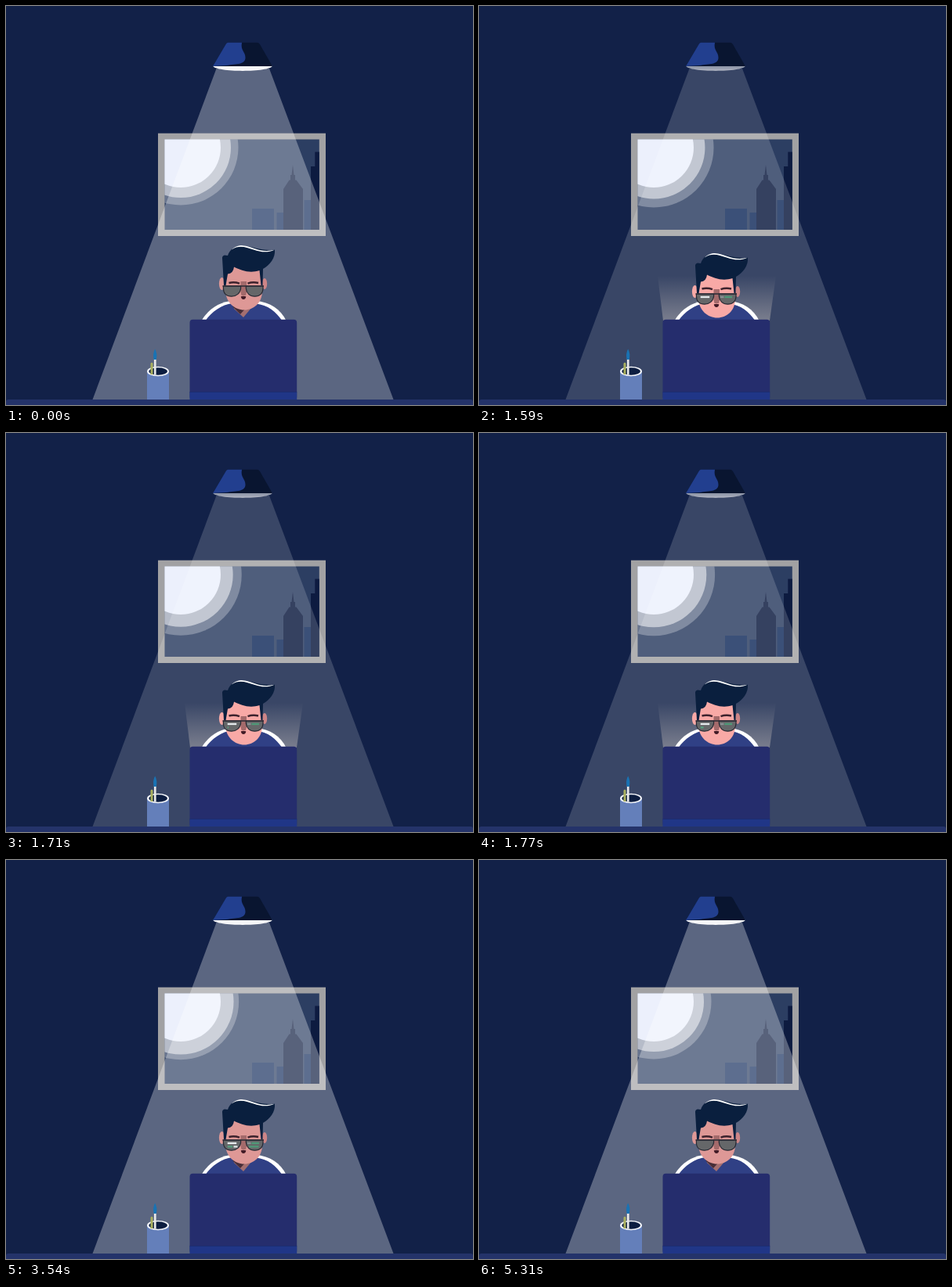
These frames come from a looping animation (596 by 510 pixels, 5340 ms). An HTML page:

```html
<!DOCTYPE html>
<html lang="en">
<head>
<meta charset="utf-8">
<title>Working late</title>
<style>
  html, body { margin: 0; width: 100%; height: 100%; overflow: hidden; background: #122148; }
  svg { display: block; width: 596px; height: 510px; }
</style>
</head>
<body>
<svg viewBox="0 0 596 510" xmlns="http://www.w3.org/2000/svg">
  <defs>
    <clipPath id="pane"><rect x="202.5" y="170.5" width="197.3" height="115.5"/></clipPath>
    <linearGradient id="screenLight" x1="0" y1="1" x2="0" y2="0">
      <stop offset="0" stop-color="#fff0df" stop-opacity=".33"/>
      <stop offset="1" stop-color="#fff0df" stop-opacity="0"/>
    </linearGradient>
  </defs>
  <rect width="596" height="510" fill="#122148"/>

  <!-- window -->
  <rect x="194" y="162.7" width="214" height="131.3" fill="#a1a1a3"/>
  <g clip-path="url(#pane)">
    <rect x="202" y="170" width="198" height="117" fill="#2c3e62"/>
    <circle id="outer" cx="223" cy="181" r="73.5" fill="#fff" opacity=".28"/>
    <circle id="middle" cx="223" cy="181" r="64" fill="#fff" opacity=".52"/>
    <circle cx="223" cy="181" r="51" fill="#ecf0fc"/>
    <path d="M314 259h28v28h-28z M345.5 264h9v23h-9z M380.5 248h8.5v39h-8.5z" fill="#142d5d"/>
    <path d="M354 287V234L361.5 222.5H363V216H364.5L366 203L367.5 216H369V222.5H370.5L379 234V287z M389 287V205H394.3V186.5H400V287z" fill="#0d1b40"/>
  </g>

  <!-- lamp -->
  <path id="cone" d="M268.5 80H336L494.5 503H110.5z" fill="#fff"/>
  <path id="bulb" d="M264 76.5H340C337 85 267 85 264 76.5z" fill="#fff"/>
  <path d="M283 46.7H321Q323 47 324 49L340 77H264L280.500 49Q281.500 47 283 46.700z" fill="#091530"/>
  <path d="M283 46.7H301C299 57 305.500 58 305.500 66C305.500 75 294 74 281 76L264 77L280.500 49Q281.500 47 283 46.700z" fill="#223f8f"/>

  <!-- cup -->
  <path d="M180 467H208V503H180z" fill="#647fba"/>
  <ellipse cx="194" cy="467" rx="14" ry="6.2" fill="#f4f6fa"/>
  <ellipse cx="194.200" cy="467" rx="11.800" ry="4.700" fill="#0c1d40"/>
  <path d="M184.500 457Q186 454.500 187.500 457V471H184.500z" fill="#a9b05e"/>
  <path d="M188.900 451H191.600V471.500H188.900z" fill="#e9e9ea"/>
  <path d="M190.200 438.500Q193.400 444 191.800 452H188.600Q187 444 190.200 438.500z" fill="#1973b4"/>

  <path id="glow" d="M235 402L228 345H379L371 402z" fill="url(#screenLight)"/>

  <!-- body -->
  <path d="M249 403C259 386 273 378 291 376.500H318C338 379 350 387 358 403z" fill="#fff"/>
  <path d="M254 403C263 390 275 382 289 380L303 378L319 380.500C334 382 345 391 353 403z" fill="#304085"/>
  <path d="M289 377H319L313 386L303 398L291 387z" fill="#a36f70"/>
  <path d="M289 384H308L299 394z" fill="#482e38"/>

  <g id="head">
    <ellipse class="skin" cx="275.600" cy="355" rx="3.700" ry="8"/>
    <ellipse cx="330" cy="355" rx="3.200" ry="7" fill="#cd8587"/>
    <path class="skin" d="M280 333H327V366C326 380 316 388.500 304 388.500C292 388.500 281 379 280.500 366z"/>
    <path d="M276 322Q276 319 279 318.500L283 319C286 310 294 305.500 303 306.300C318 308 327 314 343 311.500C344 322 337 331 328 336L327.500 357H325.500L323.500 338C311 342 300 338 291 333.500Q290 342 283 342.500L280.500 357H278z" fill="#0a1f3e"/>
    <path id="shine" d="M288 311.500C297 302 309 307 317 310C326 313.500 335 313.500 342.500 311.800C334 315.500 326 315 316 311.500C306 308 297 305 288 311.500z" fill="#fff"/>
    <path d="M299.500 352H307V366L306 370H300.500L299.500 366z" fill="#a46a6b"/>
    <g id="brows" fill="none" stroke="#3d222d" stroke-width="2.400">
      <path d="M284.500 354Q291 352.200 298 354.600"/>
      <path d="M308.500 354.600Q315 352.200 322 354"/>
    </g>
    <path d="M299.800 371.300Q303 370.300 306.300 371.300Q306 375 303 375Q300.200 375 299.800 371.300z" fill="#421b26"/>
    <g fill="#656769" stroke="#282a34" stroke-width="1.200">
      <path d="M277.400 358H299.600V361C299 367 294 371.200 287.800 371.200C281 371.200 277.400 367 277.400 361z"/>
      <path d="M306.300 358H328V361C328 367 324 371.200 317.500 371.200C311 371.200 306.800 367 306.300 361z"/>
      <path d="M276.500 358H329" stroke-width="1.500"/>
    </g>
    <g id="code" stroke-width="2.300"></g>
  </g>

  <!-- laptop and desk -->
  <rect x="234.500" y="400.700" width="136.700" height="102.500" rx="4" fill="#252d6d"/>
  <rect x="234.500" y="493.500" width="136.700" height="10" fill="#203687"/>
  <path d="M234.500 493.500H371.200" stroke="#1b2d70" stroke-width=".8"/>
  <rect y="503" width="596" height="9" rx="3" fill="#24336a"/>
</svg>
<script>
const LOOP = 5340;
const el = id => document.getElementById(id);
const clamp = v => Math.max(0, Math.min(1, v));
const ramp = (t, from, to) => clamp((t - from) / (to - from));
const ease = v => v * v * (3 - 2 * v);
const pulse = (t, period) => (1 - Math.cos(2 * Math.PI * t / period)) / 2;
const mix = (a, b, k) => a + (b - a) * k;

// Reflected code: x, y, length, colour, typed from-to, erased from-to
const strokes = [
  [282.7, 362, 11.5, '#e7ecee', 240, 450, 4700, 4860],
  [308, 362, 4.5, '#8b9296', 420, 530, 4400, 4500],
  [313.4, 362, 9.6, '#4f9a78', 1260, 1560, 4150, 4330],
  [282.7, 366.4, 6.5, '#56a17f', 1680, 1830, 4600, 4700],
  [290.5, 366.4, 5, '#dce4e6', 1950, 2150, 4500, 4600],
  [310, 366.4, 12.5, '#4f9a78', 2800, 3180, 3880, 4150]
].map(([x, y, length, colour, ...times]) => {
  const line = document.createElementNS('http://www.w3.org/2000/svg', 'line');
  const attrs = { x1: x, y1: y, y2: y, stroke: colour };
  for (const name in attrs) line.setAttribute(name, attrs[name]);
  el('code').append(line);
  return { line, x, length, times };
});
const skin = document.querySelectorAll('.skin');

function draw(t) {
  const bow = ease(ramp(t, 780, 930)) - ease(ramp(t, 2190, 2300));
  const tone = ramp(t, 780, 960) - ramp(t, 2200, 2360);
  const dim = ramp(t, 1290, 1410) - ramp(t, 1920, 2040);

  el('middle').setAttribute('r', 64 + 4.5 * pulse(t, LOOP / 4));
  el('outer').setAttribute('r', 73.5 + 4.8 * (t < 4920 ? pulse(t, 1230) : 0));

  el('cone').setAttribute('opacity', mix(.31, .165, dim));
  el('bulb').setAttribute('opacity', mix(.95, .55, dim));
  el('glow').setAttribute('opacity', dim);

  el('head').setAttribute('transform', `translate(0 ${10 * bow})`);
  el('brows').setAttribute('transform', `translate(0 ${-2.5 * bow})`);
  el('shine').setAttribute('opacity', 1 - .4 * Math.sin(Math.PI * tone));
  const colour = `rgb(${mix(222, 248, tone)},${mix(152, 169, tone)},${mix(150, 166, tone)})`;
  skin.forEach(part => part.setAttribute('fill', colour));

  for (const { line, x, length, times: [a, b, c, d] } of strokes) {
    const shown = ramp(t, a, b) - ramp(t, c, d);
    line.setAttribute('x2', x + length * shown);
  }
}

const start = performance.now();
function tick() {
  draw((performance.now() - start) % LOOP);
  requestAnimationFrame(tick);
}
tick();
</script>
</body>
</html>
```
